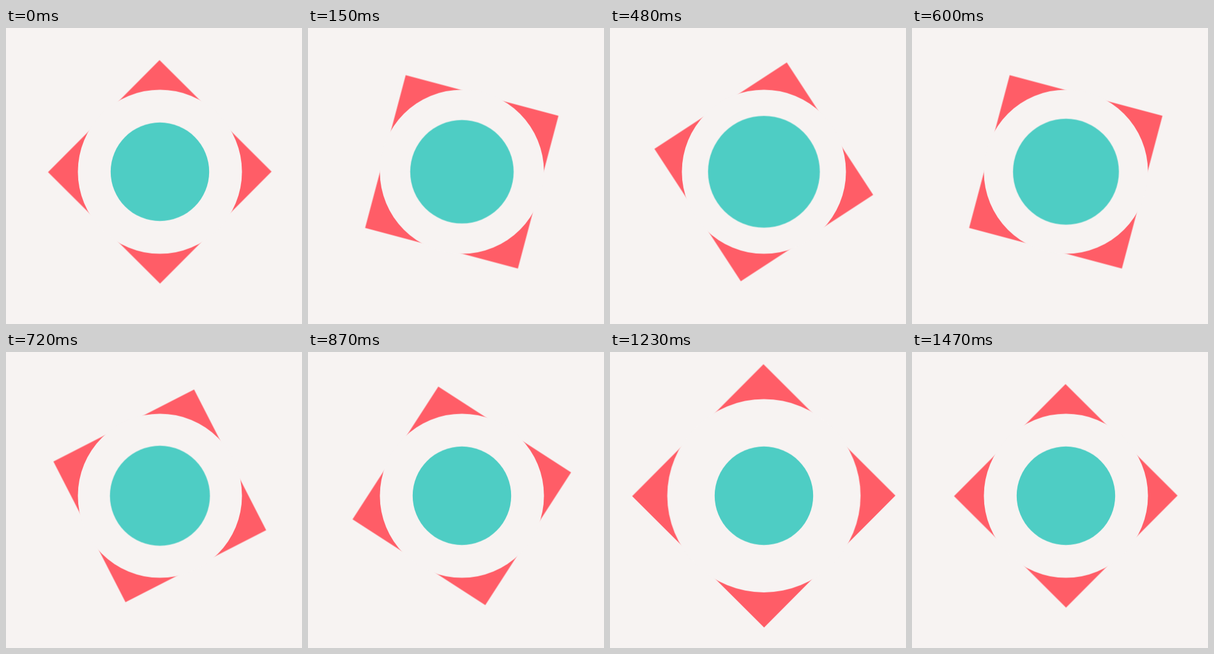
Write an HTML page that moves like this. It is 500 by 500 pixels and loops after 1830 ms.

```html
<!DOCTYPE html>
<html lang="en">
<head>
<meta charset="utf-8">
<title>Spinning square</title>
<style>
  :root { --paper: #f7f3f2; --red: #ff5d67; --teal: #4ecdc4; }
  html, body { margin: 0; width: 100%; height: 100%; overflow: hidden; background: var(--paper); }
  svg { display: block; width: 100vw; height: 100vh; }

  /* One loop is 61 ticks of 30 ms; the 1 ms lead keeps ticks off rounding edges. */
  .spin, .pulse, .swell { animation: 1830ms -1ms infinite; }
  .spin { animation-name: spin; fill: var(--red); }
  .pulse { animation-name: pulse; }
  .swell { animation-name: swell; fill: var(--teal); }
  .hole { fill: var(--paper); }

  /* 30 ticks: one full turn */
  @keyframes spin {
    0% { transform: rotate(44.87deg); animation-timing-function: steps(30); }
    49.18033%, 100% { transform: rotate(404.87deg); }
  }
  /* ticks 30 to 40 grow, 40 to 49 shrink */
  @keyframes pulse {
    0% { transform: scale(1); }
    49.18033% { transform: scale(1); animation-timing-function: steps(10); }
    65.57377% { transform: scale(1.2); animation-timing-function: steps(9); }
    80.32787%, 100% { transform: scale(1); }
  }
  /* ticks 0 to 15 grow, 15 to 25 shrink */
  @keyframes swell {
    0% { transform: scale(1); animation-timing-function: steps(15); }
    24.59016% { transform: scale(1.15); animation-timing-function: steps(10); }
    40.98361%, 100% { transform: scale(1); }
  }
</style>
</head>
<body>
<svg viewBox="0 0 500 500">
  <g transform="translate(260 242.8)">
    <g class="pulse">
      <g transform="translate(-.2 .2)">
        <rect class="spin" x="-133.5" y="-133.5" width="267" height="267"/>
      </g>
      <circle class="hole" r="138.6"/>
    </g>
    <circle class="swell" r="83.2"/>
  </g>
</svg>
</body>
</html>
```
